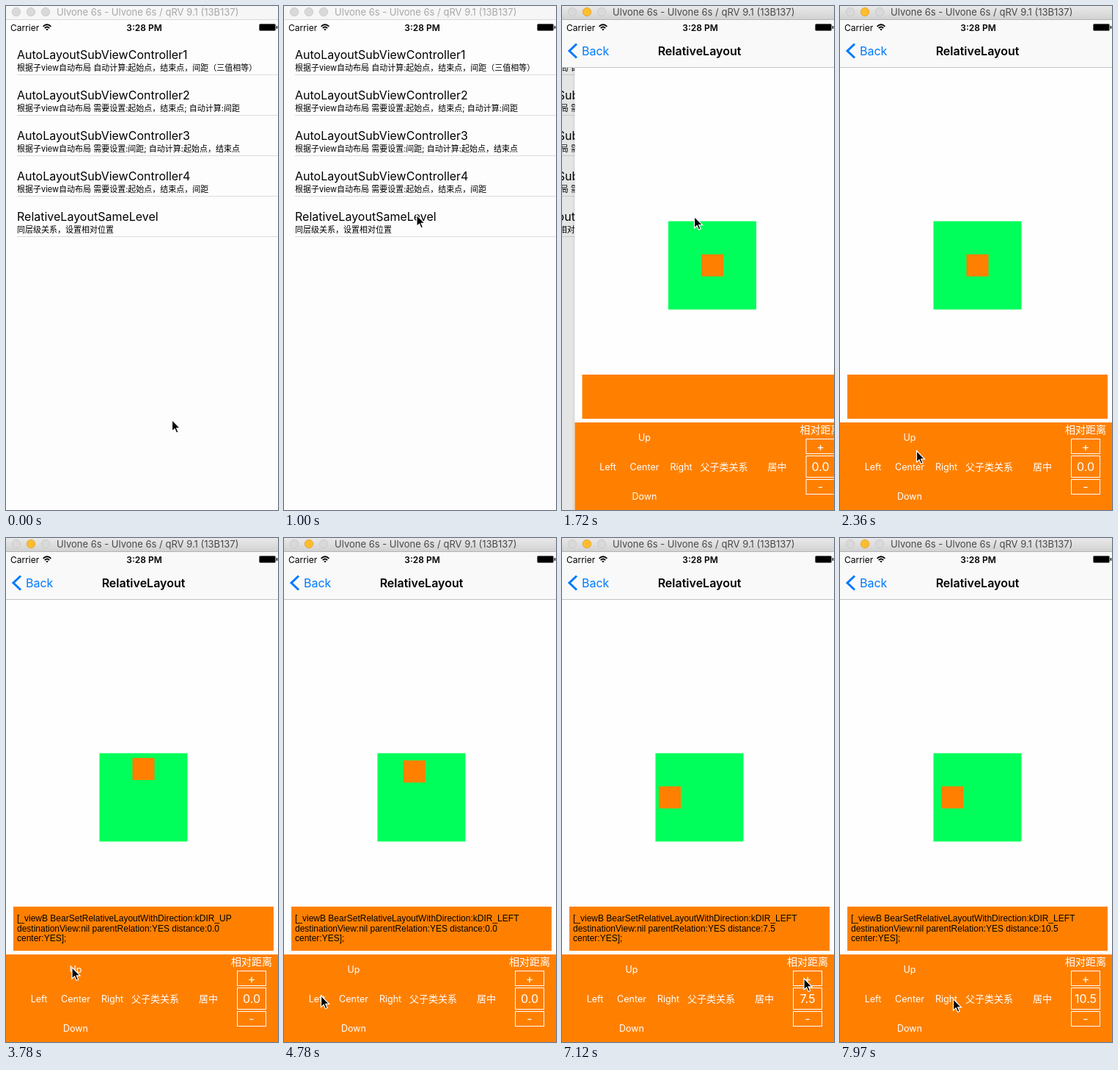
An HTML page for the animation above (8 s loop, 371 by 685 pixels).

```html
<!DOCTYPE html>
<html lang="zh-CN">
<head>
<meta charset="utf-8">
<style>
html, body { margin: 0; width: 100%; height: 100%; overflow: hidden; background: #fdfdfd; }
svg { display: block; font-family: Inter, "Noto Sans CJK SC", "Noto Sans CJK", sans-serif; }
text { white-space: pre; }
.mid { text-anchor: middle; }
.box { fill: none; stroke: #fff; }
#panel text { fill: #fff; font-size: 12.5px; }
#panel .cjk { font-size: 13px; }
#panel .big { font-size: 16px; }
#code { font: 12px "Liberation Sans", Arial, sans-serif; }
</style>
</head>
<body>
<svg width="371" height="685" viewBox="0 0 371 685">
  <defs>
    <linearGradient id="bar" x2="0" y2="1">
      <stop stop-color="#e9e9e9"/><stop offset="1" stop-color="#d2d2d2"/>
    </linearGradient>
  </defs>
  <rect width="371" height="685" fill="#fdfdfd"/>
  <g id="list"></g>
  <rect id="dim" y="19" width="371" height="666"/>

  <g id="page">
    <rect x="-3" y="84" width="3" height="601" opacity=".04"/>
    <rect y="19" width="375" height="666" fill="#fefefe"/>
    <rect x="127.5" y="292.5" width="120" height="120" fill="#00ff5a"/>
    <rect id="square" width="30" height="30" fill="#ff8000"/>
    <rect x="10" y="501" width="355" height="60" fill="#ff8000"/>
    <g id="code"><text x="15" y="521"></text><text x="15" y="534.5"></text><text x="15" y="548"></text></g>
    <g id="panel" class="mid">
      <rect y="566" width="375" height="119" fill="#ff8000"/>
      <text x="95" y="591">Up</text>
      <text x="45" y="631">Left</text>
      <text x="95" y="631">Center</text>
      <text x="145" y="631">Right</text>
      <text x="95" y="671">Down</text>
      <text class="cjk" x="203.5" y="631">父子类关系</text>
      <text class="cjk" x="276" y="631">居中</text>
      <text x="335" y="581" style="font-size:14px">相对距离</text>
      <rect class="box" x="315.5" y="588.5" width="39" height="20"/>
      <rect class="box" x="315.5" y="611.5" width="39" height="29"/>
      <rect class="box" x="315.5" y="643.5" width="39" height="20"/>
      <text class="big" x="335" y="605">+</text>
      <text class="big" x="335" y="632" id="value"></text>
      <text class="big" x="335" y="659">-</text>
    </g>
  </g>

  <g id="nav">
    <rect y="19" width="371" height="64" fill="#f9f9f9"/>
    <path d="M0 83.5H371" stroke="#c4c4c6"/>
    <path d="M20 51.5L10 61L20 70.5" fill="none" stroke="#007aff" stroke-width="3"/>
    <text x="27" y="67" font-size="16" fill="#007aff">Back</text>
    <text class="mid" x="187.5" y="67" font-size="16" font-weight="600">RelativeLayout</text>
  </g>

  <text x="6" y="34" font-size="12">Carrier</text>
  <g fill="none" stroke="#000" stroke-width="1.8">
    <path d="M50.6 27.8Q56 22.6 61.4 27.8M52.8 30.1Q56 27 59.2 30.1"/>
    <path d="M56 33.6L54.2 31.6Q56 30.4 57.8 31.6Z" fill="#000" stroke="none"/>
  </g>
  <text class="mid" x="188.5" y="34" font-size="12" font-weight="600">3:28 PM</text>
  <rect x="345.5" y="24.5" width="22" height="9" rx="1.5" fill="#000" stroke="#666"/>
  <rect x="368.7" y="27" width="1.5" height="4" rx=".7"/>

  <rect id="titlebar" width="371" height="18"/>
  <path id="edge" d="M0 18.5H371"/>
  <g stroke-width=".8">
    <circle cx="14" cy="8" r="5.7" fill="#d9d9d9" stroke="#c6c6c6"/>
    <circle id="yellow" cx="34" cy="8" r="5.7"/>
    <circle cx="54" cy="8" r="5.7" fill="#d9d9d9" stroke="#c6c6c6"/>
  </g>
  <text id="title" x="69" y="13" font-size="13">Ulvone 6s - Ulvone 6s / qRV 9.1 (13B137)</text>

  <path id="cursor" d="M0 0V15.5L3.6 12.2L6 17.8L8.6 16.7L6.2 11.3H11Z" stroke="#fff" stroke-width="1.2"/>
</svg>
<script>
const $ = id => document.getElementById(id);
const set = (id, attrs) => { for (const k in attrs) $(id).setAttribute(k, attrs[k]); };

const rows = [
  ['AutoLayoutSubViewController1', '根据子view自动布局 自动计算:起始点，结束点，间距（三值相等）'],
  ['AutoLayoutSubViewController2', '根据子view自动布局 需要设置:起始点，结束点; 自动计算:间距'],
  ['AutoLayoutSubViewController3', '根据子view自动布局 需要设置:间距; 自动计算:起始点，结束点'],
  ['AutoLayoutSubViewController4', '根据子view自动布局 需要设置:起始点，结束点，间距'],
  ['RelativeLayoutSameLevel', '同层级关系，设置相对位置']
];
$('list').innerHTML = rows.map(([name, note], i) => `<g transform="translate(15 ${55 * i})">
  <text y="72" font-size="16">${name}</text><text y="88" font-size="11">${note}</text>
  <path d="M0 93.5H460" stroke="#dcdcdd"/></g>`).join('');

const LOOP = 8000, PUSH = 1390, UP = 3400, LEFT = 4630;
const clicks = Array.from({length: 7}, (_, i) => 6430 + 172 * i);

// Cursor strokes: start, end, control point, destination
const strokes = [
  [450, 1000, 24, 400, 181, 284],
  [1700, 2120, 150, 440, 104.5, 604.5],
  [2360, 2780, 134, 622, 94.5, 585],
  [2960, 3170, 88, 586, 90, 583.5],
  [3850, 4200, 75, 610, 50.5, 615.5],
  [4320, 4400, 50, 618, 50.5, 622],
  [4780, 5280, 180, 645, 311, 645],
  [5490, 5630, 330, 615, 343.5, 592],
  [5630, 5740, 345, 590, 346, 589.5],
  [6010, 6130, 340, 592, 330, 598.5],
  [7540, 7950, 240, 620, 154.5, 626.5]
];

const ease = (t, start, end) => {
  const u = Math.min(1, Math.max(0, (t - start) / (end - start)));
  return u * u * (3 - 2 * u);
};
const slide = (t, start) => ease(t, start, start + 500);

function cursorAt(t) {
  let x = 226.5, y = 562.5;
  for (const [start, end, cx, cy, ex, ey] of strokes) {
    if (t < start) break;
    const u = ease(t, start, end), v = 1 - u;
    x = v * v * x + 2 * u * v * cx + u * u * ex;
    y = v * v * y + 2 * u * v * cy + u * u * ey;
  }
  return `translate(${x} ${y})`;
}

function draw(t) {
  const active = t >= PUSH;
  set('titlebar', {fill: active ? 'url(#bar)' : '#f6f6f6'});
  set('edge', {stroke: active ? '#b4b4b4' : '#d8d8d8'});
  set('yellow', active ? {fill: '#ffbd2e', stroke: '#e0a028'} : {fill: '#d9d9d9', stroke: '#c6c6c6'});
  set('title', {fill: active ? '#484848' : '#a8a8a8'});

  const push = !active ? 0 : t > PUSH + 600 ? 1 : 1 - Math.exp((PUSH - t) / 108);
  set('list', {transform: `translate(${-112.5 * push} 0)`});
  set('dim', {opacity: 0.1 * push});
  set('page', {transform: `translate(${375 * (1 - push)} 0)`, visibility: active ? 'visible' : 'hidden'});
  set('nav', {visibility: active ? 'visible' : 'hidden'});

  const up = slide(t, UP), left = slide(t, LEFT);
  const shift = clicks.reduce((sum, c) => sum + 1.5 * slide(t, c), 0);
  set('square', {x: 172.5 - 45 * left + shift, y: 337.5 - 45 * up + 45 * left});

  const distance = (1.5 * clicks.filter(c => t >= c).length).toFixed(1);
  $('value').textContent = distance;
  const lines = t < UP ? ['', '', ''] : [
    '[_viewB BearSetRelativeLayoutWithDirection:kDIR_' + (t < LEFT ? 'UP' : 'LEFT'),
    'destinationView:nil parentRelation:YES distance:' + distance,
    'center:YES];'
  ];
  lines.forEach((line, i) => $('code').children[i].textContent = line);
  set('cursor', {transform: cursorAt(t)});
}

const origin = performance.now();
function tick() {
  draw((performance.now() - origin) % LOOP);
  requestAnimationFrame(tick);
}
tick();
</script>
</body>
</html>
```
